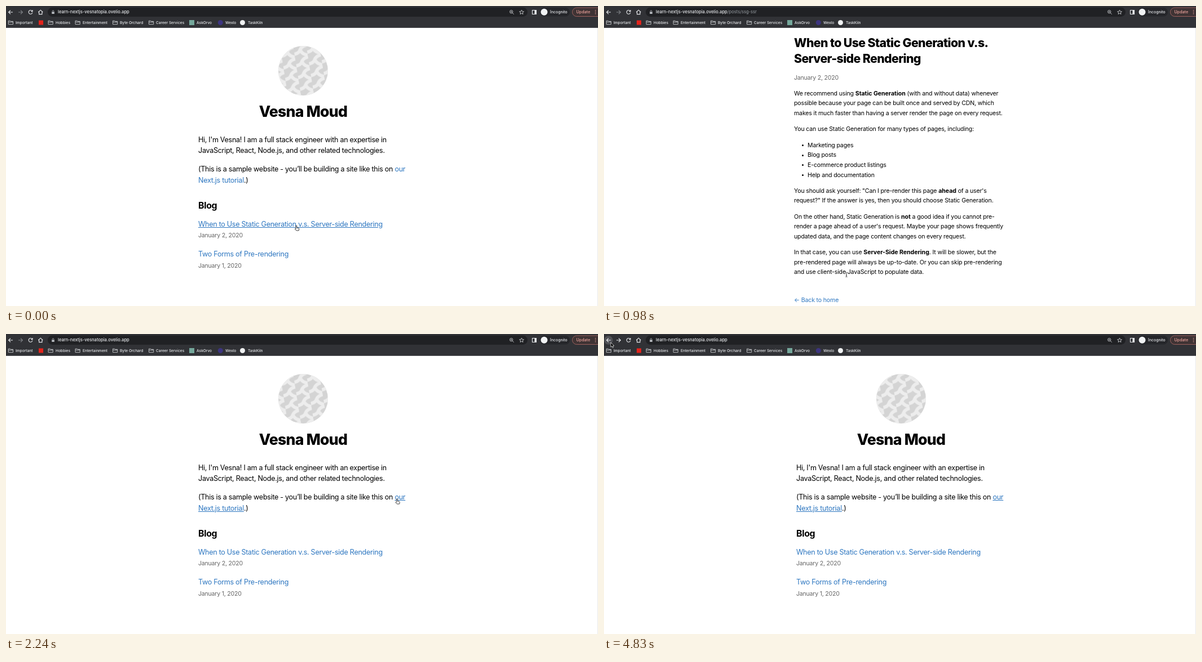
Recreate the animation shown at these times as an HTML page. Size 1050 by 533 pixels, loop 5.46 s.

```html
<!DOCTYPE html>
<html lang="en">
<head>
<meta charset="utf-8">
<title>Blog walkthrough</title>
<style>
html, body { margin: 0; width: 100%; height: 100%; overflow: hidden; background: #fff; }
body { position: relative; color: #000; font-family: Inter, "Noto Sans", sans-serif; }
main, section, header, svg { position: absolute; left: 0; }
main { top: 39px; width: 100%; height: calc(100% - 39px); overflow: hidden; }
section { top: -39px; width: 1050px; height: 900px; }
header { top: 0; width: 1050px; height: 39px; background: #313236; overflow: hidden; }
svg { top: 0; overflow: visible; }

/* Text: --x is the left edge, --y the middle of the first line */
p, h1, h2, h3, li {
  --lh: 17.55px;
  position: absolute; margin: 0; white-space: pre; list-style: none;
  left: calc(var(--x) * 1px); top: calc(var(--y) * 1px - var(--lh) / 2);
  font-size: 10.6px; line-height: var(--lh); letter-spacing: -.0165em;
}
.c { transform: translateX(-50%); }
h1 { --lh: 28.8px; font-size: 21.3px; font-weight: 800; letter-spacing: -.62px; }
h1.big { font-size: 26.7px; letter-spacing: -.8px; }
h2 { font-size: 15.9px; font-weight: 700; letter-spacing: -.02em; }
b { letter-spacing: -.005em; }
.intro { --lh: 19.4px; font-size: 12.6px; letter-spacing: -.0245em; }
.date { color: #666; letter-spacing: -.022em; }
a { color: #2e77c0; }
li::before {
  content: ""; position: absolute; left: -10.5px; top: 7.3px;
  width: 3px; height: 3px; border-radius: 50%; background: #000;
}

.learn { color: #111; }
.learn p { --lh: 14.6px; font-size: 8.37px; letter-spacing: 0; }
.learn h2 { font-size: 13.8px; font-weight: 600; letter-spacing: -.02em; }
.learn h3 { font-size: 9.5px; font-weight: 600; letter-spacing: 0; }
.learn .nav { font-size: 7.4px; color: #666; }
.learn .side { font-size: 7.6px; }
.learn .part { font-size: 6.8px; font-weight: 600; }
.learn .light { color: #b5b5b5; }
.learn .white { color: #fff; }
.card {
  position: absolute; left: 248px; top: 92px; width: 147px; height: 52px;
  background: #fff; border-radius: 3px; box-shadow: 0 1px 4px #0003;
}
.blue { position: absolute; background: #1b6dfa; border-radius: 3px; box-shadow: 0 1px 4px #1b6dfa66; }

header p { --lh: 10px; font-size: 6.55px; font-weight: 500; letter-spacing: 0; color: #e8eaed; }
header .url { font-size: 7.6px; }
.url span { color: #9aa0a6; font-weight: 400; }
.url i { position: absolute; left: 100%; font-style: normal; }

/* Timeline: one frame of 70 ms is 1.28205% of the loop */
.home, .post1, .post2, .learn, .site, .on-learn, .path1, .path2, .fwd, .press,
.arrow, .hand, .beam, .cursor, .scroll, .u1, .u2, .u3, .u4, .u5 {
  animation: 5460ms step-end infinite;
}
.home { animation-name: home; }
.post1, .path1 { animation-name: post1; }
.post2, .path2 { animation-name: post2; }
.learn, .on-learn { animation-name: learn; }
.site { animation-name: site; }
.fwd { animation-name: fwd; }
.press { animation-name: press; }
.arrow { animation-name: arrow; }
.hand { animation-name: hand; }
.beam { animation-name: beam; }
.cursor { animation-name: glide; }
.scroll { animation-name: scroll; }
.u1 { animation-name: u1; }
.u2 { animation-name: u2; }
.u3 { animation-name: u3; }
.u4 { animation-name: u4; }
.u5 { animation-name: u5; }

@keyframes home {
  0%, 20.5128%, 35.8974%, 55.1282% { opacity: 1; }
  7.6923%, 28.2051%, 42.307% { opacity: 0; }
}
@keyframes post1 { 0%, 20.5128% { opacity: 0; } 7.6923% { opacity: 1; } }
@keyframes post2 { 0%, 35.8974% { opacity: 0; } 28.2051% { opacity: 1; } }
@keyframes learn { 0%, 55.1282% { opacity: 0; } 42.307% { opacity: 1; } }
@keyframes site { 0%, 55.1282% { opacity: 1; } 42.307% { opacity: 0; } }
@keyframes fwd { 0% { stroke: #808388; } 55.1282%, 100% { stroke: #e8eaed; } }
@keyframes press { 0% { opacity: 0; } 53.846%, 100% { opacity: 1; } }
@keyframes hand {
  0%, 19.2308%, 25.641%, 33.3333%, 41.0256% { opacity: 1; }
  8.974%, 20.5128%, 28.2051%, 35.8974%, 42.307% { opacity: 0; }
}
@keyframes beam {
  0%, 19.2308%, 33.3333% { opacity: 0; }
  8.974%, 28.2051% { opacity: 1; }
}
@keyframes arrow {
  0%, 25.641%, 41.0256% { opacity: 0; }
  20.5128%, 35.8974%, 42.307%, 100% { opacity: 1; }
}
@keyframes glide {
  0% { transform: translate(515px, 390px); }
  8.974% { transform: translate(515px, 390px); animation-timing-function: steps(5); }
  15.3846% { transform: translate(480px, 432px); animation-timing-function: steps(3); }
  19.2308% { transform: translate(405px, 500px); }
  20.5128% { transform: translate(406px, 499px); }
  23.0769% { transform: translate(406px, 499px); animation-timing-function: steps(2); }
  25.641% { transform: translate(412px, 442px); }
  29.487% { transform: translate(412px, 442px); animation-timing-function: steps(3); }
  33.3333% { transform: translate(404px, 505.5px); }
  35.8974% { transform: translate(404px, 503px); animation-timing-function: steps(4); }
  41.0256% { transform: translate(693.5px, 293px); }
  47.435% { transform: translate(693.5px, 293px); animation-timing-function: steps(5); }
  53.846%, 100% { transform: translate(12px, 15px); }
}
@keyframes scroll {
  0% { transform: translateY(0); }
  10.2564% { transform: translateY(0); animation-timing-function: steps(4); }
  15.3846% { transform: translateY(-97px); animation-timing-function: steps(3); }
  19.2308%, 100% { transform: translateY(-166px); }
}
@keyframes u1 { 0% { text-decoration: underline; } 7.6923%, 100% { text-decoration: none; } }
@keyframes u2 { 0%, 28.2051%, 100% { text-decoration: none; } 25.641% { text-decoration: underline; } }
@keyframes u3 { 0%, 20.5128%, 100% { text-decoration: none; } 19.2308% { text-decoration: underline; } }
@keyframes u4 { 0%, 35.8974%, 100% { text-decoration: none; } 33.3333% { text-decoration: underline; } }
@keyframes u5 { 0% { text-decoration: none; } 41.0256%, 100% { text-decoration: underline; } }
</style>
</head>
<body>
<svg width="0" height="0">
  <defs>
    <pattern id="weave" width="23" height="21" patternUnits="userSpaceOnUse" patternTransform="rotate(-9) translate(3 4)">
      <path d="M-2 15Q8 15 11 9Q14 3 25 2M11 9Q13 16 20 19" fill="none" stroke="#ededed" stroke-width="6" stroke-linecap="round"/>
    </pattern>
    <symbol id="avatar" viewBox="0 0 88 88">
      <circle cx="44" cy="44" r="44" fill="#d4d4d4"/>
      <circle cx="44" cy="44" r="44" fill="url(#weave)"/>
    </symbol>
    <path id="folder" d="M.5 1.2H3.6L4.6 2.3H8.7V7.6H.5ZM.5 3.6H8.7" fill="none" stroke="#c8cacd" stroke-width=".9"/>
  </defs>
</svg>

<main>
  <section class="home">
    <svg width="1050" height="533"><use href="#avatar" x="483" y="71" width="88" height="88"/></svg>
    <h1 class="big c" style="--x:527;--y:187.5">Vesna Moud</h1>
    <p class="intro" style="--x:341;--y:237.3">Hi, I'm Vesna! I am a full stack engineer with an expertise in
JavaScript, React, Node.js, and other related technologies.</p>
    <p class="intro" style="--x:341;--y:289.8">(This is a sample website - you’ll be building a site like this on <a class="u5">our</a>
<a class="u5">Next.js tutorial</a>.)</p>
    <h2 style="--x:341;--y:355">Blog</h2>
    <p class="intro" style="--x:341;--y:387.5"><a class="u1">When to Use Static Generation v.s. Server-side Rendering</a></p>
    <p class="date" style="--x:341;--y:407.8">January 2, 2020</p>
    <p class="intro" style="--x:341;--y:440.7"><a class="u2">Two Forms of Pre-rendering</a></p>
    <p class="date" style="--x:341;--y:461.3">January 1, 2020</p>
  </section>

  <section class="post1" style="left:-4px"><div class="scroll">
    <svg width="1050" height="533"><use href="#avatar" x="494" y="71" width="66" height="66"/></svg>
    <h2 class="c" style="--x:527;--y:160">Vesna Moud</h2>
    <h1 style="--x:341;--y:208">When to Use Static Generation v.s.
Server-side Rendering</h1>
    <p class="date" style="--x:341;--y:270.3">January 2, 2020</p>
    <p style="--x:341;--y:298.5">We recommend using <b>Static Generation</b> (with and without data) whenever
possible because your page can be built once and served by CDN, which
makes it much faster than having a server render the page on every request.</p>
    <p style="--x:341;--y:362">You can use Static Generation for many types of pages, including:</p>
    <li style="--x:365;--y:390.7">Marketing pages</li>
    <li style="--x:365;--y:408.2">Blog posts</li>
    <li style="--x:365;--y:425.8">E-commerce product listings</li>
    <li style="--x:365;--y:443.4">Help and documentation</li>
    <p style="--x:341;--y:471.6">You should ask yourself: "Can I pre-render this page <b>ahead</b> of a user's
request?" If the answer is yes, then you should choose Static Generation.</p>
    <p style="--x:341;--y:517.5">On the other hand, Static Generation is <b>not</b> a good idea if you cannot pre-
render a page ahead of a user's request. Maybe your page shows frequently
updated data, and the page content changes on every request.</p>
    <p style="--x:341;--y:581">In that case, you can use <b>Server-Side Rendering</b>. It will be slower, but the
pre-rendered page will always be up-to-date. Or you can skip pre-rendering
and use client-side JavaScript to populate data.</p>
    <p style="--x:341;--y:666"><a class="u3">← Back to home</a></p>
  </div></section>

  <section class="post2">
    <svg width="1050" height="533"><use href="#avatar" x="494" y="71" width="66" height="66"/></svg>
    <h2 class="c" style="--x:527;--y:160">Vesna Moud</h2>
    <h1 style="--x:341;--y:208">Two Forms of Pre-rendering</h1>
    <p class="date" style="--x:341;--y:241.3">January 1, 2020</p>
    <p style="--x:341;--y:270">Next.js has two forms of pre-rendering: <b>Static Generation</b> and <b>Server-side
Rendering</b>. The difference is in <b>when</b> it generates the HTML for a page.</p>
    <li style="--x:365;--y:316"><b>Static Generation</b> is the pre-rendering method that generates the
HTML at <b>build time</b>. The pre-rendered HTML is then <em>reused</em> on each
request.</li>
    <li style="--x:365;--y:368.5"><b>Server-side Rendering</b> is the pre-rendering method that generates
the HTML on <b>each request</b>.</li>
    <p style="--x:341;--y:414.4">Importantly, Next.js lets you <b>choose</b> which pre-rendering form to use for
each page. You can create a "hybrid" Next.js app by using Static Generation
for most pages and using Server-side Rendering for others.</p>
    <p style="--x:341;--y:500"><a class="u4">← Back to home</a></p>
  </section>

  <section class="learn">
    <svg width="1050" height="533">
      <path d="M0 74H1050" stroke="#e6e6e6"/>
      <circle cx="198" cy="57" r="6"/>
      <path d="M213 63L219 50" stroke="#e4e4e4"/>
      <path d="M246.500 51h11v11h-11z"/>
      <rect x="757.500" y="47" width="52" height="19.500" rx="3" fill="#fff" stroke="#ececec"/>
      <circle cx="769" cy="57" r="4"/>
      <rect x="814.500" y="46.500" width="40" height="20" rx="3"/>
      <path d="M257.500 144V533" stroke="#ededed"/>
      <circle cx="257.500" cy="194.800" r="2.600"/>
      <!-- evenly spaced dots, one run per chapter -->
      <g fill="none" stroke="#e2e2e2" stroke-width="3.600" stroke-linecap="round" stroke-dasharray="0 19.650">
        <path d="M257.500 234.200V274M257.500 337.600V456M257.500 519.500V521M271 214.500V216"/>
      </g>
      <rect x="421.500" y="325" width="375.500" height="60.500" fill="#f2f2f2"/>
    </svg>
    <p class="nav" style="--x:301;--y:56.5">Showcase</p>
    <p class="nav" style="--x:350.5;--y:56.5">Docs</p>
    <p class="nav" style="--x:382;--y:56.5">Blog</p>
    <p class="nav" style="--x:411;--y:56.5">Analytics</p>
    <p class="nav" style="--x:457;--y:56.5">Templates</p>
    <p class="nav" style="--x:507;--y:56.5">Enterprise</p>
    <svg width="1050" height="533">
      <g fill="none" stroke="#777" stroke-width=".6">
        <path id="out" d="M446 54.500L449 51.500M446.800 51.500H449V53.700"/>
        <use href="#out" x="49"/><use href="#out" x="99.500"/>
      </g>
    </svg>
    <p class="nav" style="--x:778;--y:56.5;color:#000;font-weight:500">Deploy</p>
    <p class="nav white" style="--x:824;--y:56.5;font-weight:500">Learn</p>

    <div class="card"></div>
    <p class="c" style="--x:321.5;--y:109;font-size:9.5px"><b>0</b> points</p>
    <p class="c light" style="--x:321.5;--y:130;font-size:7.5px">Share</p>

    <p class="part" style="--x:269;--y:175">FOUNDATIONS</p>
    <p class="side" style="--x:269;--y:194.8;font-weight:600">About Next.js</p>
    <p class="side" style="--x:282;--y:214.5">What is Next.js?</p>
    <p class="side" style="--x:269;--y:234.2;--lh:19.65px">From JavaScript to React
From React to Next.js
How Next.js Works</p>
    <p class="part" style="--x:269;--y:317.8">CREATE YOUR FIRST APP</p>
    <p class="side" style="--x:269;--y:337.5;--lh:19.65px">Create a Next.js App
Navigate Between Pages
Assets, Metadata, and CSS
Pre-rendering and Data Fetching
Dynamic Routes
API Routes
Deploying Your Next.js App</p>
    <p class="part" style="--x:269;--y:499.7">SEARCH ENGINE OPTIMIZATION</p>
    <p class="side" style="--x:269;--y:519.5">Introduction to SEO</p>

    <h2 style="--x:421;--y:102.5">Introduction</h2>
    <div class="blue" style="left:418.5px;top:129px;width:18px;height:19px"></div>
    <p class="c white" style="--x:427.5;--y:138.7;font-weight:600">1</p>
    <p class="c light" style="--x:450;--y:138.7">2</p>
    <p style="--x:421;--y:179.5">To effectively use Next.js, it helps to be familiar with JavaScript, React, and related web
development concepts. But JavaScript and React are vast topics. How do you know when
you’re ready to learn Next.js?</p>
    <p style="--x:421;--y:232.5">Welcome to the Next.js Foundations course! This beginner-friendly, example-led course will
guide you through the prerequisite knowledge for Next.js. You will build a simple project step-
by-step; starting with a JavaScript application, then migrating it to React and Next.js.</p>
    <p style="--x:421;--y:285">Each section builds on the previous one, so you can choose where to start depending on what
you already know.</p>
    <p style="--x:432;--y:341">This tutorial assumes knowledge of HTML, CSS, JavaScript, and no knowledge of React.
If you’re already familiar with React, you can skip to the <a>Getting Started with Next.js</a>
section or <a>Create your first Next.js app</a>.</p>
    <h3 style="--x:421;--y:411.7">Join the Conversation</h3>
    <p style="--x:421;--y:436">If you have questions about anything related to Next.js or this course, you’re welcome to ask
our community on <a>Murmelo</a>.</p>
    <p style="--x:421;--y:474.3">Let’s get started!</p>
    <div class="blue" style="left:421px;top:508.5px;width:85px;height:22px"></div>
    <p class="white" style="--x:438;--y:519.5;font-size:8.7px">Start Now →</p>
  </section>
  <svg width="1050" height="494"><path d="M1049.500 0V494" stroke="#e9e9e9"/></svg>
</main>

<header>
  <svg width="1050" height="39" fill="none" stroke="#e8eaed" stroke-width="1.100">
    <path d="M0 38.500H1050" stroke="#505155"/>
    <rect x="74" y="2.500" width="851" height="16.500" rx="8.200" fill="#202124" stroke="none"/>
    <circle class="press" cx="8" cy="11" r="7.700" fill="#505156" stroke="none"/>
    <path d="M12 11H5M8 7.600L4.600 11L8 14.400"/>
    <path class="fwd" d="M22 11H29M26 7.600L29.400 11L26 14.400"/>
    <path d="M46.300 8.800A3.400 3.400 0 1 0 46.900 11.600M47 7V9.600H44.400"/>
    <path d="M57.300 11L61.300 7.200L65.300 11M58.600 10.300V14.600H64V10.300"/>
    <path d="M81.200 10.500h4.600v3.400h-4.600z" fill="#bdc1c6" stroke="none"/>
    <path d="M82.200 10.500V9.200a1.300 1.300 0 0 1 2.600 0V10.500" stroke="#bdc1c6" stroke-width=".8"/>
    <g class="site" stroke="#c8cacd" stroke-width=".9">
      <circle cx="896.200" cy="10.200" r="2.700"/><path d="M898.200 12.200L900.800 14.800M895 10.200H897.400M896.200 9V11.400"/>
    </g>
    <path d="M914.500 7L915.600 9.700L918.500 9.900L916.300 11.700L917 14.500L914.500 13L912 14.500L912.700 11.700L910.500 9.900L913.400 9.700Z" stroke="#c8cacd" stroke-width=".9"/>
    <path d="M933.500 7.500H940.500V14.500H933.500Z"/><path d="M937.500 7h3.500v8h-3.500z" fill="#e8eaed" stroke="none"/>
    <rect x="947" y="3" width="53" height="15.500" rx="7.700" fill="#25262a" stroke="none"/>
    <circle cx="954.500" cy="10.800" r="6" fill="#f1f3f4" stroke="none"/>
    <rect x="1004.500" y="3" width="56" height="15.500" rx="7.700" fill="#3f3334" stroke="#a86661" stroke-width=".9"/>
    <path d="M1045.500 7.800V14" stroke="#eea49d" stroke-width="1.600" stroke-linecap="round" stroke-dasharray="0 3"/>
    <use href="#folder" x="3.800" y="25"/><use href="#folder" x="74.500" y="25"/><use href="#folder" x="122.500" y="25"/>
    <use href="#folder" x="189" y="25"/><use href="#folder" x="253" y="25"/>
    <g stroke="none">
      <path d="M58 25.500h8v8h-8z" fill="#e3241c"/>
      <path d="M325 25h9v9h-9z" fill="#74a79b"/>
      <circle cx="380.300" cy="29.500" r="4.500" fill="#3d3580"/>
      <circle cx="419.500" cy="29.500" r="4.500" fill="#f1f3f4"/>
    </g>
  </svg>
  <p class="url site" style="--x:92;--y:10.8">learn-nextjs-vesnatopia.ovelio.app<i class="path1"><span>/posts/ssg-ssr</span></i><i class="path2"><span>/posts/pre-rendering</span></i></p>
  <p class="url on-learn" style="--x:92;--y:10.8">nextjs.org<span>/learn/foundations/about-nextjs</span></p>
  <p style="--x:965;--y:10.8;font-size:6.9px">Incognito</p>
  <p style="--x:1011.5;--y:10.8;font-size:7.1px;color:#eea49d">Update</p>
  <p style="--x:17;--y:29.5">Important</p>
  <p style="--x:88;--y:29.5">Hobbies</p>
  <p style="--x:136;--y:29.5">Entertainment</p>
  <p style="--x:202;--y:29.5">Byte Orchard</p>
  <p style="--x:266;--y:29.5">Career Services</p>
  <p style="--x:338;--y:29.5">AskOrvo</p>
  <p style="--x:389;--y:29.5">Wexlo</p>
  <p style="--x:429;--y:29.5">TaskKiln</p>
</header>

<svg class="cursor" width="12" height="12">
  <path class="arrow" d="M0 0V8.200L1.900 6.500L3.200 9.400L4.600 8.800L3.400 6H6Z" fill="#000" stroke="#fff" stroke-width=".7"/>
  <path class="hand" d="M-.8 5V.9a.9.900 0 0 1 1.800 0V4l2.800.6q1.100.3 1 1.500L4.200 9H0L-2.600 6.200q.2-1.200 1.800-.2z" fill="#fff" stroke="#111" stroke-width=".8"/>
  <path class="beam" d="M-1.600-4Q0-4 0-3V3Q0 4-1.600 4M1.600-4Q0-4 0-3M0 3Q0 4 1.600 4M-1 1H1" fill="none" stroke="#222" stroke-width=".8"/>
</svg>
</body>
</html>
```
